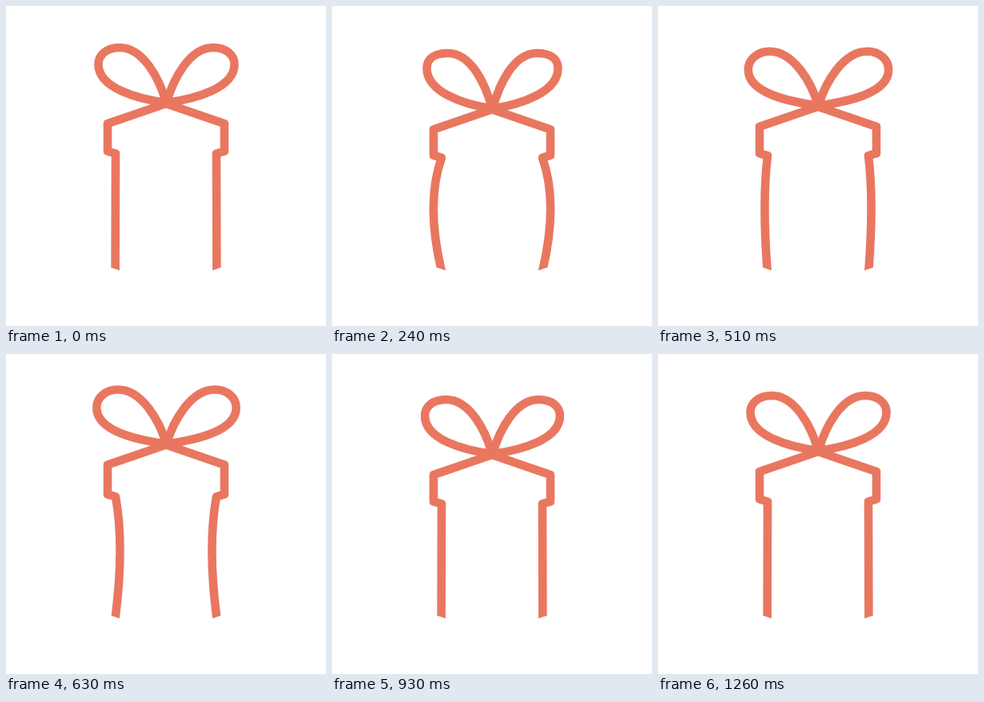
Animation, 400 px wide and 400 px high, one loop 1320 ms. Source, as an HTML page with a canvas:

```html
<!DOCTYPE html>
<html lang="en">
<head>
<meta charset="utf-8">
<title>Jumping gift</title>
<style>
html, body { margin: 0; width: 100%; height: 100%; overflow: hidden; background: #fff; }
canvas { display: block; width: 100vmin; height: 100vmin; }
</style>
</head>
<body>
<canvas id="stage" width="400" height="400"></canvas>
<script>
const ctx = document.getElementById('stage').getContext('2d');
const LOOP = 1320, STEP = 30, LAST = 1260;

// time, lid drop, inward bend of the sides, bow spread, bow height
const POSES = [
  [0, 0, 0, 0, 70],
  [120, 3.2, -7.5, -3, 71],
  [360, 9.6, -11, -3, 69],
  [420, 9.3, -10, -1.5, 68.5],
  [540, 1, -1, 3.3, 69],
  [630, -8.5, 5.5, 2.2, 69],
  [720, -13.3, 6, -1, 78],
  [810, -7, 5.5, -2.6, 73.7],
  [930, 4, 0, -0.6, 69],
  [1020, 3.6, -1.5, 0.3, 69.3],
  [1110, -1.4, 0.6, 0, 70.3],
  [1260, 0, 0, 0, 70]
];

// Smooth slope through a pose, flat at turning points
function slope(i, k) {
  if (i === 0 || i === POSES.length - 1) return 0;
  const [a, b, c] = [POSES[i - 1], POSES[i], POSES[i + 1]];
  const before = (b[k] - a[k]) / (b[0] - a[0]);
  const after = (c[k] - b[k]) / (c[0] - b[0]);
  return before * after <= 0 ? 0 : 2 * before * after / (before + after);
}

function valueAt(t, k) {
  let i = 0;
  while (i < POSES.length - 2 && t >= POSES[i + 1][0]) i++;
  const a = POSES[i], b = POSES[i + 1], span = b[0] - a[0];
  const u = (t - a[0]) / span, v = 1 - u;
  return v * v * (1 + 2 * u) * a[k] + u * u * (1 + 2 * v) * b[k]
    + span * u * v * (v * slope(i, k) - u * slope(i + 1, k));
}

function mirrored(axis, draw) {
  for (const side of [1, -1]) {
    ctx.save();
    ctx.translate(axis, 0);
    ctx.scale(side, 1);
    ctx.translate(-axis, 0);
    draw();
    ctx.restore();
  }
}

function drawBox(drop, bend) {
  const top = 147 + drop;
  const rim = 181.5 + drop * 0.72;
  const start = rim + 3, height = 330 - start;
  const belly = 137 + bend * 1.36;
  ctx.beginPath();
  ctx.moveTo(200, 122 + drop);
  ctx.lineTo(127, top);
  ctx.lineTo(127, rim);
  ctx.lineTo(137, start);
  ctx.bezierCurveTo(belly, start + height * 0.27, belly, start + height * 0.6, 136.6, 330);
  ctx.lineTo(136.9 - bend * 0.1, 338);
  ctx.stroke();
}

function drawLoop(drop, spread, height) {
  const knot = 122 + drop;
  const crown = knot - height, crownX = 142 - spread * 0.9;
  const left = 115.5 - spread, leftY = knot - 49 * height / 70 + spread * 0.8;
  ctx.beginPath();
  ctx.moveTo(200, knot - 2);
  ctx.bezierCurveTo(192, knot - 30 * height / 70, crownX + 30, crown, crownX, crown);
  ctx.bezierCurveTo(crownX - 16, crown, left, leftY - 12, left, leftY);
  ctx.bezierCurveTo(left, leftY + 30, 165, knot - 6, 200, knot - 1);
  ctx.stroke();
}

function render(now) {
  const t = Math.min(Math.floor((now % LOOP) / STEP) * STEP, LAST);
  const [drop, bend, spread, height] = [1, 2, 3, 4].map(k => valueAt(t, k));
  ctx.fillStyle = '#fff';
  ctx.fillRect(0, 0, 400, 400);
  ctx.strokeStyle = '#e97760';
  ctx.lineWidth = 10.6;
  ctx.lineJoin = ctx.lineCap = 'round';

  // The open base is cut along a shallow V
  ctx.save();
  ctx.beginPath();
  ctx.moveTo(0, 0);
  ctx.lineTo(400, 0);
  ctx.lineTo(400, 283);
  ctx.lineTo(200, 350);
  ctx.lineTo(0, 283);
  ctx.clip();
  mirrored(200, () => drawBox(drop, bend));
  ctx.restore();
  mirrored(200.5, () => drawLoop(drop, spread, height));
}

let origin;
function frame(now) {
  origin ??= now;
  render(now - origin);
  requestAnimationFrame(frame);
}
render(0);
requestAnimationFrame(frame);
</script>
</body>
</html>
```
